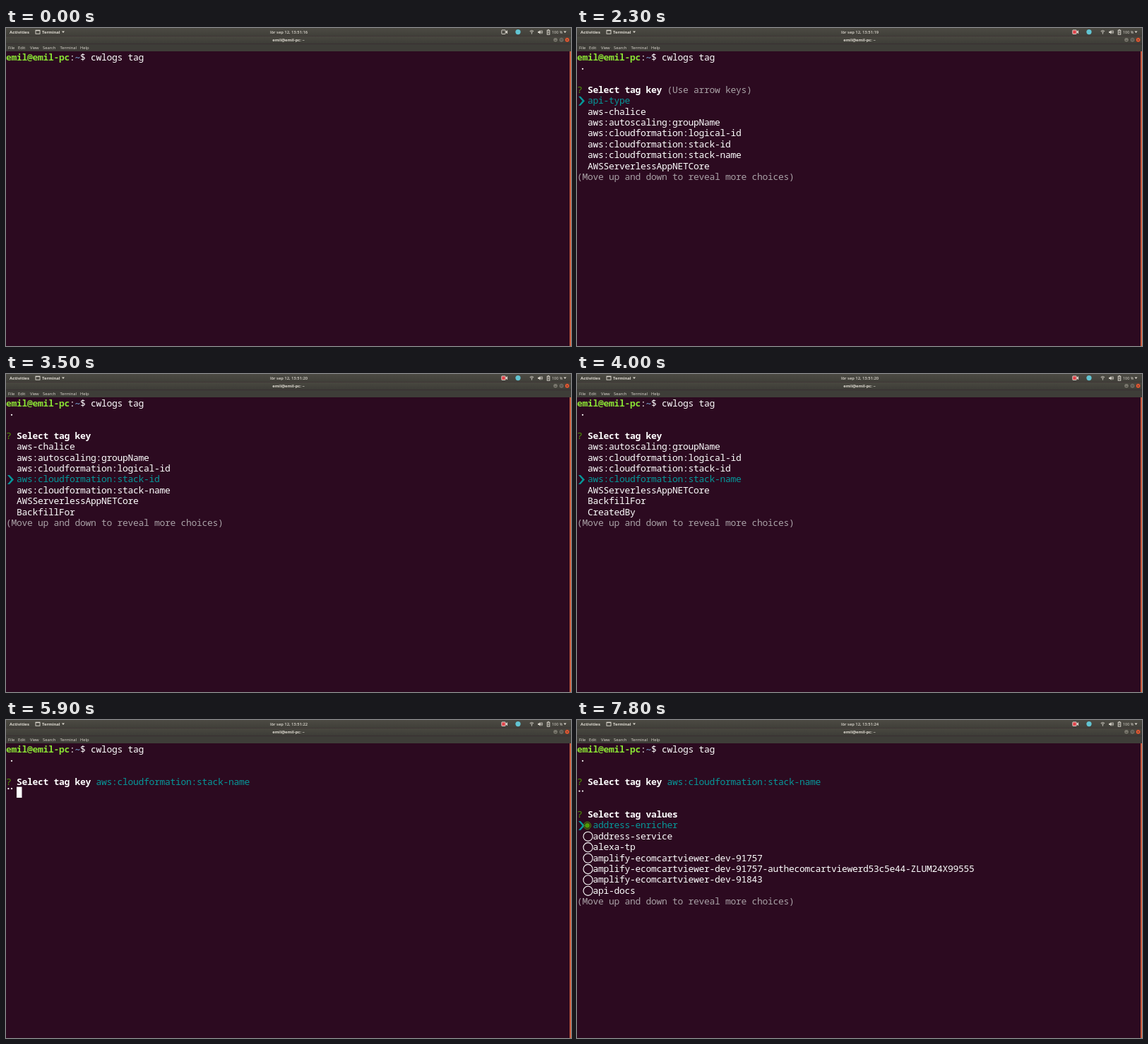
Recreate the animation shown at these times as an HTML page. Size 800 px wide and 450 px high, loop 8000 ms.

```html
<!DOCTYPE html>
<html lang="en">
<head>
<meta charset="utf-8">
<title>Terminal session</title>
<style>
  html, body { margin: 0; width: 100%; height: 100%; overflow: hidden; background: #2c0a20; }
  svg { display: block; width: 800px; height: 450px; }
  .ui { font: 5.8px "Open Sans", "Noto Sans", sans-serif; fill: #dfdbd2; }
  .bold { font-weight: 700; }
  #screen text {
    font: 13px "Noto Sans Mono", "DejaVu Sans Mono", monospace;
    letter-spacing: -.3px;
    white-space: pre;
  }
  #screen text.bold { font-weight: 700; }
  #rec { animation: rec 8s step-end infinite; }
  @keyframes rec { 0% { fill: #4a4942; } 1.25%, 100% { fill: #e0434b; } }
</style>
</head>
<body>
<svg viewBox="0 0 800 450">
  <defs>
    <linearGradient id="panel" x2="0" y2="1"><stop stop-color="#4c4a43"/><stop offset="1" stop-color="#403f39"/></linearGradient>
    <linearGradient id="bar" x2="0" y2="1"><stop stop-color="#494840"/><stop offset="1" stop-color="#3d3c37"/></linearGradient>
  </defs>
  <rect width="800" height="450" fill="#2c0a20"/>
  <rect width="800" height="11.5" fill="url(#panel)"/>
  <rect y="11.5" width="800" height="11" fill="url(#bar)"/>
  <rect y="22.5" width="800" height="10.5" fill="#3e3d38"/>
  <rect x="798" y="33" width="2" height="417" fill="#cf5f40"/>

  <g class="ui">
    <text class="bold" x="5" y="7.8" font-size="6">Activities</text>
    <text class="bold" x="51" y="7.8">Terminal</text>
    <text class="bold" id="clock" x="400.5" y="7.8" style="font-weight:600" text-anchor="middle"></text>
    <text class="bold" x="400" y="19.2" text-anchor="middle">emil@emil-pc: ~</text>
    <text x="3" y="30">File</text>
    <text x="17" y="30">Edit</text>
    <text x="34" y="30">View</text>
    <text x="52" y="30">Search</text>
    <text x="76.5" y="30">Terminal</text>
    <text x="105" y="30">Help</text>
    <text x="773" y="7.7" style="font-size:5.4px">100 %</text>
    <path d="M79 4.5h4l-2 2.6zM789.5 4.5h4l-2 2.6z"/>
  </g>

  <g fill="none" stroke="#dfdbd2" stroke-width=".9">
    <rect x="42" y="3.2" width="6" height="5"/>
    <path d="M42 3.6h6" stroke-width="1.2"/>
    <rect id="rec" x="701.8" y="2.9" width="5.4" height="5.6" rx=".6"/>
    <path d="M707.6 5.7l2-2v4z" fill="#dfdbd2"/>
    <path d="M741.7 4.6q2.7-2.2 5.4 0M742.9 6q1.5-1.2 3 0M744.4 6.6v2"/>
    <path d="M753.2 4.7h1.4l2-1.8v5.8l-2-1.8h-1.4z" fill="#dfdbd2" stroke="none"/>
    <path d="M757.4 4.3q1 1.4 0 2.8M758.6 3.2q2 2.5 0 5"/>
    <rect x="766.2" y="3.2" width="3.6" height="6"/>
    <path d="M767.1 2.4h1.8M768 4.6v3"/>
  </g>
  <circle cx="725" cy="5.6" r="3.6" fill="#62c4d2"/>
  <g stroke="#33322d" stroke-width=".6">
    <circle cx="778" cy="16.8" r="3.3" fill="#7c7a70"/>
    <circle cx="786.5" cy="16.8" r="3.3" fill="#7c7a70"/>
    <circle cx="794.6" cy="16.8" r="3.3" fill="#ee5b33"/>
  </g>
  <path d="M776.6 17.6h2.8M785.3 15.7h2.4v2.2h-2.4zM793.4 15.6l2.4 2.4m0-2.4l-2.4 2.4" fill="none" stroke="#3a3934" stroke-width=".7"/>

  <g id="screen"></g>
</svg>

<script>
const LOOP = 8000, CELL = 7.5, ROW = 15.4, TOP = 33;
const WHITE = '#fff', GREY = '#a9a1a6', TEAL = '#06989a', GREEN = '#4e9a06';
const SPIN = '⠁⠁⠉⠙⠚⠒⠂⠂⠒⠲⠴⠤⠄⠄⠤⠠⠠⠤⠦⠖⠒⠐⠐⠒⠓⠋⠉⠈⠈';
const MORE = '(Move up and down to reveal more choices)';
const KEYS = [
  'api-type', 'aws-chalice', 'aws:autoscaling:groupName',
  'aws:cloudformation:logical-id', 'aws:cloudformation:stack-id',
  'aws:cloudformation:stack-name', 'AWSServerlessAppNETCore',
  'BackfillFor', 'CreatedBy'
];
const VALUES = [
  'address-enricher', 'address-service', 'alexa-tp',
  'amplify-ecomcartviewer-dev-91757',
  'amplify-ecomcartviewer-dev-91757-authecomcartviewerd53c5e44-ZLUM24X99555',
  'amplify-ecomcartviewer-dev-91843', 'api-docs'
];
const HINT = [
  ['(Press ', WHITE], ['<space>', TEAL], [' to select, ', WHITE], ['<a>', TEAL],
  [' to toggle all, ', WHITE], ['<i>', TEAL], [' to invert selection)', WHITE]
];
const MOVES = [2500, 2800, 3100, 3400, 3900];

const screen = document.getElementById('screen');
const clock = document.getElementById('clock');
let out;

function add(tag, attrs, content) {
  const el = document.createElementNS('http://www.w3.org/2000/svg', tag);
  for (const name in attrs) el.setAttribute(name, attrs[name]);
  if (content) el.textContent = content;
  out.append(el);
}

const middle = row => TOP + row * ROW + 8.2;

function print(row, col, text, fill = WHITE, bold = false) {
  add('text', { x: col * CELL, y: TOP + row * ROW + 12.6, fill, class: bold ? 'bold' : '' }, text);
}

function pointer(row) {
  add('path', { d: 'M2-6h3l6 6.5l-6 6.5h-3l5.5-6.5z', transform: `translate(0 ${middle(row)})`, fill: TEAL });
}

function ring(row, color) {
  add('circle', { cx: 15.6, cy: middle(row) + .4, r: 6.6, fill: 'none', stroke: color, 'stroke-width': 1.1 });
}

function fisheye(row) {
  const at = { cx: 14.6, cy: middle(row) + .3 };
  add('circle', { ...at, r: 5.1, fill: 'none', stroke: GREEN });
  add('circle', { ...at, r: 3.5, fill: GREEN });
}

function cursor(row, col) {
  add('rect', { x: col * CELL, y: TOP + row * ROW, width: CELL, height: ROW, fill: WHITE });
}

function spinner(row, step) {
  const bits = SPIN.charCodeAt(step % SPIN.length) & 63;
  for (let i = 0; i < 6; i++) {
    if (bits >> i & 1) {
      add('circle', { cx: i < 3 ? 3.4 : 8, cy: TOP + row * ROW + 2.6 + i % 3 * 3.4, r: 1.15, fill: WHITE });
    }
  }
}

function question(row, text) {
  print(row, 0, '?', GREEN);
  print(row, 2, text, WHITE, true);
}

function keyList(pick) {
  const first = Math.max(0, pick - 3);
  if (!pick) print(3, 17, '(Use arrow keys)', GREY);
  KEYS.slice(first, first + 7).forEach((name, i) => {
    const on = first + i === pick;
    if (on) pointer(4 + i);
    print(4 + i, 2, name, on ? TEAL : WHITE);
  });
  print(11, 0, MORE, GREY);
}

function valueList(checked) {
  if (!checked) {
    let col = 20;
    for (const [text, color] of HINT) {
      print(6, col, text, color, color === TEAL);
      col += text.length;
    }
  }
  VALUES.forEach((name, i) => {
    const color = i ? WHITE : TEAL;
    if (!i) pointer(7);
    if (!i && checked) fisheye(7); else ring(7 + i, color);
    print(7 + i, 3, name, color);
  });
  print(14, 0, MORE, GREY);
}

// Spinner position after `start`, held at `last` once the work is done
const spinStep = (t, start, delay, last) =>
  Math.max(0, Math.min(last, Math.floor((t - start) / delay)));

function stateAt(t) {
  return {
    spin1: t < 600 ? -1 : spinStep(t, 570, 60, 16),
    spin2: t < 4300 ? -1 : spinStep(t, 4322, 59.9, 37),
    cursor1: t >= 300 && t < 900,
    cursor2: t >= 4300 && t < 6700 && (t - 4300) % 1200 < 600,
    keys: t >= 1600,
    pick: MOVES.filter(m => t >= m).length,
    values: t >= 6700,
    checked: t >= 7700
  };
}

function draw(s) {
  out = document.createDocumentFragment();
  print(0, 0, 'emil@emil-pc', '#8ae234', true);
  print(0, 12, ':');
  print(0, 13, '~', '#729fcf', true);
  print(0, 14, '$ cwlogs tag');

  if (s.spin1 >= 0) spinner(1, s.spin1);
  if (s.cursor1) cursor(1, s.spin1 < 0 ? 0 : 2);

  if (s.keys) {
    question(3, 'Select tag key');
    if (s.spin2 < 0) keyList(s.pick);
    else {
      print(3, 17, KEYS[5], TEAL);
      spinner(4, s.spin2);
    }
  }
  if (s.cursor2) cursor(4, 2);

  if (s.values) {
    question(6, 'Select tag values');
    valueList(s.checked);
  }
  screen.replaceChildren(out);
}

let shown = '';
function frame() {
  const t = performance.now() % LOOP;
  const state = stateAt(t);
  const key = JSON.stringify(state);
  if (key !== shown) {
    draw(state);
    shown = key;
  }
  clock.textContent = 'lör sep 12, 13:51:' + (16 + Math.floor((t + 700) / 1000));
  requestAnimationFrame(frame);
}
frame();
</script>
</body>
</html>
```
